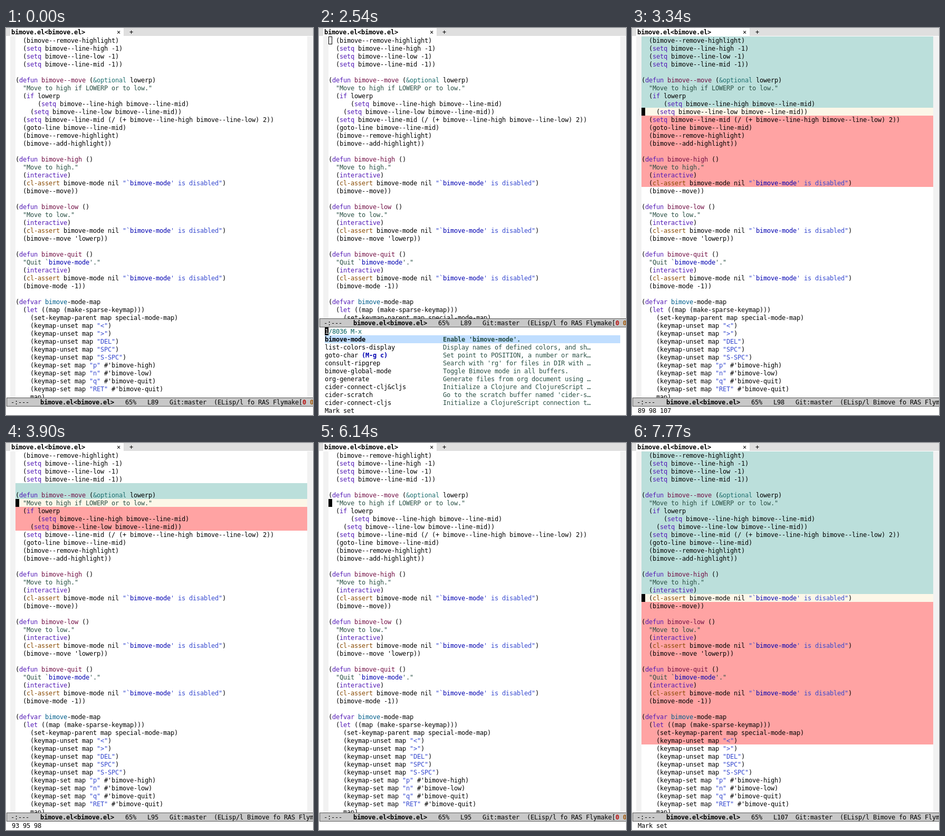
Recreate the animation shown at these times as an HTML page. Size 582 px wide and 733 px high, loop 8000 ms.

```html
<!DOCTYPE html>
<html lang="en">
<head>
<meta charset="utf-8">
<title>bimove</title>
<style>
html, body { margin: 0; width: 100%; height: 100%; overflow: hidden; background: #fff; }
svg { display: block; width: 582px; height: 733px; }
text { white-space: pre; font-family: "DejaVu Sans Mono", monospace; font-size: 12px; font-variant-ligatures: none; fill: #000; }
.b { font-weight: 700; }
.k { fill: #531ab6; }
.f { fill: #721045; }
.v { fill: #005e8b; }
.t { fill: #1f6f6f; }
.w { fill: #884900; }
.s { fill: #3548cf; }
.d { fill: #2a5045; }
.c { fill: #0000b0; }
.p { fill: #005f5f; }
.r { fill: #b81010; }
.o { fill: #a05a10; }
.i { fill: #fff; }
</style>
</head>
<body>
<svg id="stage" viewBox="0 0 582 733"></svg>
<script>
const assertLine = "  (cl-assert bimove-mode nil \"`bimove-mode' is disabled\")";
const code = `  (bimove--remove-highlight)
  (setq bimove--line-high -1)
  (setq bimove--line-low -1)
  (setq bimove--line-mid -1))

(defun bimove--move (&optional lowerp)
  "Move to high if LOWERP or to low."
  (if lowerp
      (setq bimove--line-high bimove--line-mid)
    (setq bimove--line-low bimove--line-mid))
  (setq bimove--line-mid (/ (+ bimove--line-high bimove--line-low) 2))
  (goto-line bimove--line-mid)
  (bimove--remove-highlight)
  (bimove--add-highlight))

(defun bimove-high ()
  "Move to high."
  (interactive)
${assertLine}
  (bimove--move))

(defun bimove-low ()
  "Move to low."
  (interactive)
${assertLine}
  (bimove--move 'lowerp))

(defun bimove-quit ()
  "Quit \`bimove-mode'."
  (interactive)
${assertLine}
  (bimove-mode -1))

(defvar bimove-mode-map
  (let ((map (make-sparse-keymap)))
    (set-keymap-parent map special-mode-map)
    (keymap-unset map "<")
    (keymap-unset map ">")
    (keymap-unset map "DEL")
    (keymap-unset map "SPC")
    (keymap-unset map "S-SPC")
    (keymap-set map "p" #'bimove-high)
    (keymap-set map "n" #'bimove-low)
    (keymap-set map "q" #'bimove-quit)
    (keymap-set map "RET" #'bimove-quit)
    map)`.split("\n");

const commands = [
  ["bimove-mode", "Enable 'bimove-mode'."],
  ["list-colors-display", "Display names of defined colors, and sh…"],
  ["goto-char (M-g c)", "Set point to POSITION, a number or mark…"],
  ["consult-ripgrep", "Search with 'rg' for files in DIR with …"],
  ["bimove-global-mode", "Toggle Bimove mode in all buffers."],
  ["org-generate", "Generate files from org document using …"],
  ["cider-connect-clj&cljs", "Initialize a Clojure and ClojureScript …"],
  ["cider-scratch", "Go to the scratch buffer named 'cider-s…"],
  ["cider-connect-cljs", "Initialize a ClojureScript connection t…"],
  ["cider-jack-in-clj", "Start an nREPL server for the current p…"]
];

// Each step changes part of the state; menu 1 is the open list, 2 the list just after Enter.
const steps = [
  [0, { on: 0, line: 89, high: 0, low: 0, echo: "", menu: 0 }],
  [430, { on: 1 }], [930, { on: 0 }], [1430, { on: 1 }],
  [1670, { menu: 1 }], [2170, { on: 0 }], [2540, { on: 1, menu: 2 }],
  [2600, { menu: 0, high: 89, low: 125, line: 107, echo: "Mark set" }],
  [3200, { on: 0 }], [3310, { on: 1 }],
  [3340, { low: 107, line: 98, echo: "89 98 107" }],
  [3500, { echo: "Mark set" }],
  [3540, { low: 98, line: 93, echo: "89 93 98" }],
  [3870, { echo: "Mark set" }],
  [3900, { high: 93, line: 95, echo: "93 95 98" }],
  [4500, { on: 0 }], [4900, { on: 1 }], [5410, { on: 0 }], [5910, { on: 1 }],
  [6140, { high: 0, low: 0, echo: "" }],
  [6670, { on: 0 }], [6970, { on: 1, menu: 1 }], [7510, { on: 0 }],
  [7740, { on: 1, menu: 2 }],
  [7770, { menu: 0, high: 89, low: 125, line: 107, echo: "Mark set" }]
];

const stage = document.getElementById("stage");
const esc = s => s.replace(/&/g, "&amp;").replace(/</g, "&lt;").replace(/>/g, "&gt;");
const span = (cls, s) => `<tspan class=${cls}>${s}</tspan>`;
const text = (x, y, s, cls = "") => `<text x="${x}" y="${y}" class="${cls}">${s}</text>`;
const rect = (x, y, w, h, fill) => `<rect x="${x}" y="${y}" width="${w}" height="${h}" fill="${fill}"/>`;
const rowY = line => 16 + 15 * (line - 89);

function highlight(line) {
  const kind = /^ *"/.test(line) ? "d" : "s";
  return esc(line)
    .replace(/"[^"]*"/g, m => span(kind, m.replace(/`([\w-]+)'/, (_, n) => "`" + span("c", n) + "'")))
    .replace(/\((setq|if|let|interactive|defun|defvar)\b/g, (_, n) => "(" + span("k", n))
    .replace(/(defun<\/tspan> )([\w-]+)/, (_, a, n) => a + span("f", n))
    .replace(/(defvar<\/tspan> )(bimove)/, (_, a, n) => a + span("v", n))
    .replace("&amp;optional", span("t", "&amp;optional"))
    .replace("cl-assert", span("w", "cl-assert"));
}

const fileName = esc("bimove.el<bimove.el>");
const buffer = code.map((s, i) => text(18, rowY(89 + i) + 12, highlight(s))).join("");
const tabs = rect(0, 0, 582, 15, "#dfdfdf") + rect(8, 0, 215, 16, "#fff") +
  text(10, 12, fileName, "b") + text(210, 12, "×") + text(234, 12, "+");
const fringes = rect(8, 16, 10, 700, "#f2f2f2") + rect(571, 16, 10, 700, "#f2f2f2");

function menuRow([name, note], i) {
  const y = 744 + 15 * i, bold = i ? "" : " b";
  return text(11, y, esc(name).replace(/\(.*\)/, m => `<tspan class="b c">${m}</tspan>`), bold) +
    text(235, y, esc(note), "d" + bold);
}

function modeLine({ line, high }) {
  return `<rect x="1.5" y="700.5" width="583" height="16" fill="#c8c8c8" stroke="#5a5a5a"/>` +
    text(9, 713, "-:---") + text(65, 713, fileName, "b") +
    text(226, 713, "65%") + text(268, 713, "L" + line) + text(310, 713, "Git:master") +
    text(394, 713, `(ELisp/l ${high ? "Bimove " : ""}fo RAS Flymake[` +
      `<tspan class="b r">0</tspan> <tspan class="b o">0</tspan>`);
}

function menuView({ on, menu }) {
  const list = menu === 1 ? commands : commands.slice(0, 9);
  let out = rect(11, 732, 560, 15, "#c0deff") + text(11, 729, "1/8036 M-x ", "p") + list.map(menuRow).join("");
  if (menu === 2) {
    out += rect(11, 717, 7, 15, "#000") + text(11, 729, "1", "i") + text(11, 879, "Mark set");
  } else if (on) out += rect(88, 717, 7, 15, "#000");
  return out;
}

function bands({ high, low, line }) {
  if (!high) return "";
  const band = (a, b, fill) => rect(18, rowY(a), 553, rowY(b) - rowY(a), fill);
  return band(high, line, "#bbdfdb") + band(line, line + 1, "#fcf7e8") + band(line + 1, low + 1, "#ffa3a3");
}

function draw(s) {
  const y = rowY(s.line);
  const cursor = s.menu
    ? `<rect x="18.5" y="${y + .5}" width="6" height="14" fill="none" stroke="#000"/>`
    : s.on ? rect(18, y, 7, 15, "#000") : "";
  stage.innerHTML = fringes + bands(s) + buffer + cursor + tabs +
    `<g transform="translate(0 ${s.menu ? -150 : 0})">` + rect(0, 700, 582, 190, "#fff") +
    modeLine(s) + (s.menu ? menuView(s) : text(11, 729, s.echo)) + "</g>";
}

// Set the text on a grid of 7 px character cells.
stage.innerHTML = text(0, 12, "0".repeat(50));
stage.style.letterSpacing = 7 - stage.firstChild.getComputedTextLength() / 50 + "px";

let shown = -1;
function tick(now) {
  const t = now % 8000;
  const past = steps.filter(([at]) => at <= t);
  if (past.length !== shown) {
    shown = past.length;
    draw(Object.assign({}, ...past.map(([, change]) => change)));
  }
  requestAnimationFrame(tick);
}
tick(0);
</script>
</body>
</html>
```
